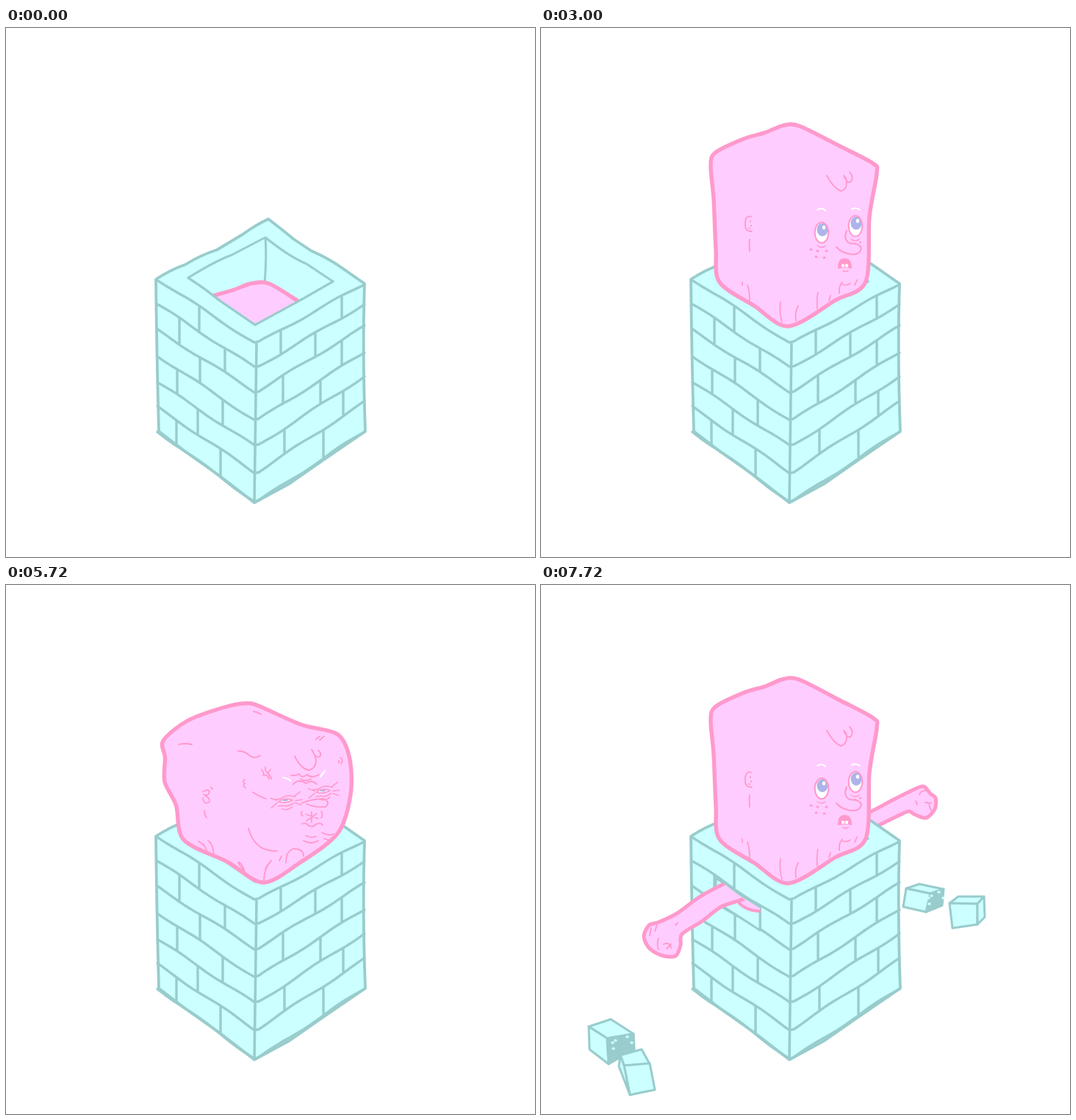
Recreate the animation shown at these times as an HTML page with a canvas. Size 720 px wide and 720 px high, loop 8.16 s.

```html
<!DOCTYPE html>
<html lang="en">
<head>
<meta charset="utf-8">
<title>Well head</title>
<style>
html, body { margin: 0; width: 100%; height: 100%; overflow: hidden; background: #fff; }
canvas { display: block; width: 100vw; height: 100vh; }
</style>
</head>
<body>
<canvas id="c" width="720" height="720"></canvas>
<script>
const g = document.getElementById('c').getContext('2d');
const LOOP = 8160, STEP = 40;
const SKIN = '#fcf', PINK = '#f9c', STONE = '#cff', TEAL = '#9cc', IRIS = '#aeb4ea';
g.lineCap = g.lineJoin = 'round';

const nums = s => s.trim().split(/[\s,]+/).map(Number);
const clamp = u => Math.max(0, Math.min(1, u));
const span = (t, a, b) => clamp((t - a) / (b - a));
const easeIn = u => u * u;
const easeOut = u => 1 - (1 - u) ** 2;
const easeBoth = u => u * u * (3 - 2 * u);

function ink(path, color, width, fill) {
  if (fill) { g.fillStyle = fill; g.fill(path); }
  if (color) { g.strokeStyle = color; g.lineWidth = width; g.stroke(path); }
}
const draw = (d, color, width, fill) => ink(new Path2D(d), color, width, fill);

function at(x, y, angle, fn) {
  g.save();
  g.translate(x, y);
  g.rotate(angle);
  fn();
  g.restore();
}

// Catmull-Rom curve through flat x,y pairs
function curve(p, closed) {
  const n = p.length / 2, path = new Path2D(), k = 0.15;
  const pt = i => {
    i = closed ? (i + n) % n : Math.max(0, Math.min(n - 1, i));
    return [p[2 * i], p[2 * i + 1]];
  };
  path.moveTo(p[0], p[1]);
  for (let i = 0; i < (closed ? n : n - 1); i++) {
    const [a, b, c, d] = [pt(i - 1), pt(i), pt(i + 1), pt(i + 2)];
    path.bezierCurveTo(b[0] + (c[0] - a[0]) * k, b[1] + (c[1] - a[1]) * k,
      c[0] - (d[0] - b[0]) * k, c[1] - (d[1] - b[1]) * k, c[0], c[1]);
  }
  if (closed) path.closePath();
  return path;
}

// ---- poses: 17 outline points, then ear, eyes, nose, mouth, curl, look, lid/tilt
const EDGE = 34, BODY = 46;
const low = nums(`338,407 290,378 250,345 241,315 237,275 235,248 243,234 275,218 320,205
  345,196 370,196 410,220 446,244 453,265 450,318 443,346 395,380
  283,322 376,336 427,325 414,372 410,400 407,276 0,-3 1,0`);
const tall = nums(`337,406 290,378 243,346 238,300 235,230 231,185 237,166 275,147 305,138
  330,128 352,129 405,156 452,181 457,195 447,255 442,345 400,371
  283,265 382,277 428,268 418,296 413,321 407,206 1,-4 0,0`);
const side = nums(`335,403 295,378 252,350 253,320 262,255 267,190 273,171 315,157 350,151
  375,146 388,147 425,171 458,191 464,208 453,300 440,345 395,377
  312,272 419,279 449,279 441,308 426,326 427,216 4,0 0,.6`);
const droop = nums(`340,403 300,382 249,348 251,315 262,265 283,212 300,183 350,182 400,184
  430,184 440,185 465,210 502,235 491,257 461,295 445,345 400,373
  311,284 415,300 447,302 438,335 416,342 450,248 -2,4 0,1`);
const squash = nums(`350,405 300,377 242,347 230,300 216,268 215,235 214,212 245,185 295,167
  325,161 345,165 400,190 451,203 466,235 469,285 450,338 400,378
  272,288 380,292 430,282 418,296 416,315 412,238 0,0 0,0`);

const mix = (a, b, u) => a.map((v, i) => v + (b[i] - v) * u);
function lift(p, d) {
  const top = Math.min(...p.slice(0, EDGE).filter((v, i) => i % 2));
  return p.map((v, i) => i < BODY && i % 2 ? v - d * Math.max(0, (345 - v) / (345 - top)) : v);
}
const sunk = low.map((v, i) => i >= BODY ? v : i % 2 ? v + 152 : v - 12);
const risen = lift(tall, -9), turned = mix(side, droop, 0.15), gasp = lift(tall, 15);

const keys = [
  [0, sunk], [1320, sunk], [2040, low, easeOut], [2760, low],
  [2960, lift(tall, -3), easeBoth], [3080, risen, easeBoth], [3400, risen],
  [3720, side, easeIn], [4040, turned, easeOut], [4360, turned],
  [4600, lift(droop, -4), easeBoth], [4720, droop, easeOut], [4880, droop],
  [5160, lift(tall, 17), easeBoth], [5280, gasp, easeOut], [5520, gasp],
  [5720, squash, easeBoth], [7520, squash],
  [7640, lift(tall, 2), easeBoth], [7720, tall, easeOut], [LOOP, tall]
];
function poseAt(t) {
  const i = keys.findIndex(k => k[0] > t);
  const [t0, a] = keys[i - 1], [t1, b, ease] = keys[i];
  const u = span(t, t0, t1);
  return mix(a, b, ease ? ease(u) : u);
}

// ---- tower
const leftY = nums('342 376 411 446 482 516 549');
const midY = nums('430 463 496 535 570 606 646');
const rightY = nums('348 376 406 441 474 509 549');
const wave = (x, k) => 1.4 * Math.sin(x / 15 + k * 2);
const wallY = (x, k) => wave(x, k) + (x < 340
  ? leftY[k] + (midY[k] - leftY[k]) * (x - 206) / 134
  : midY[k] + (rightY[k] - midY[k]) * (x - 340) / 148);
// vertical joints of each course
const joints = [[263, 374, 457], [236, 298, 421], [264, 377, 457], [233, 295, 428], [261, 379, 459], [232, 292, 432]];

const bricks = new Path2D();
for (let k = 0; k < 7; k++)
  for (let x = 206; x <= 488; x += 6) bricks[x > 206 ? 'lineTo' : 'moveTo'](x, wallY(x, k));
joints.forEach((row, k) => row.forEach(x => {
  bricks.moveTo(x, wallY(x, k));
  bricks.lineTo(x, wallY(x, k + 1));
}));
const shell = 'M204,342 Q224,329 244,322 Q265,309 287,302 L322,281 Q340,268 357,260 Q378,276 391,287 L415,303 Q440,314 458,327 L488,348 Q485,440 489,549 L432,588 L386,620 L338,646 L290,609 L246,578 L208,549 Q205,440 204,342Z';
const rimBack = 'M248,340 Q285,317 307,309 L353,285 Q385,311 409,321 L445,345';
const rimFront = 'M248,340 Q270,354 291,371 L339,404 L405,368 L445,345';

function tower() {
  draw(shell, TEAL, 3.8, STONE);
  ink(bricks, TEAL, 3.4);
  draw('M341,430 Q339,540 338,646', TEAL, 3.6);
  draw(rimBack + 'M353,285 Q355,310 352,348', TEAL, 3);
  draw(rimFront, TEAL, 3);
}

// ---- face
function eye(x, y, look, lid, tilt, shut) {
  if (lid > 0.05)
    at(x + 6 * lid, y + 15 * lid, -0.2, () => draw('M-10,0 a10,14 0 1,0 20,0 a10,14 0 1,0 -20,0', PINK, 1.5, PINK));
  at(x, y, tilt * 0.25 - lid * 0.15, () => {
    const ry = 13.5 * (1 - shut) + 0.5;
    const ball = new Path2D();
    ball.ellipse(0, 0, 9.3, ry, 0, 0, 7);
    ink(ball, null, 0, shut > 0.7 ? PINK : '#fff');
    g.save();
    g.clip(ball);
    const iris = new Path2D(), dot = new Path2D();
    iris.ellipse(look[0], look[1], 7.5, 9, 0, 0, 7);
    dot.ellipse(look[0] + 2, look[1] - 3, 2.2, 2.8, 0, 0, 7);
    ink(iris, null, 0, IRIS);
    ink(dot, null, 0, '#fff');
    g.restore();
    ink(ball, PINK, 2);
    draw('M-6,18 q6,4 11,0', PINK, 1.4);
  });
}

function calmFace(p, shut) {
  const [ex, ey, lx, ly, rx, ry, nx, ny, mx, my, cx, cy, dx, dy, lid, tilt] = p.slice(EDGE);
  at(ex, ey, tilt * 0.15, () => draw('M3,-10 q-8,-2 -8,9 q-1,12 9,11 M2,-4 v1 M3,2 v1 M0,6 h1 M1,21 q-1,5 0,16', PINK, 1.8));
  at(cx, cy, -tilt * 0.5, () => draw('M-18,-8 Q-9,9 1,13 Q9,11 9,2 Q9,-5 5,-8 Q9,2 14,1 Q20,-5 13,-13', PINK, 1.9));
  draw(`M${lx - 6},${ly - 31 + lid * 9} q6,-4 11,1 M${rx - 5},${ry - 23 + lid * 6} q6,-3 11,1`, '#fff', 2);
  eye(lx, ly, [dx, dy], lid, tilt, shut);
  eye(rx, ry, [dx, dy], lid, tilt, shut);
  const fy = ly + 30 + lid * 11 - tilt * 6, fx = lx - 4 + lid * 12;
  [[-11, -7], [-2, -5], [10, -5], [-4, 3], [7, 4]].forEach(([x, y]) => draw(`M${fx + x},${fy + y} h1`, PINK, 3));
  draw(`M${rx - 1},${ry + 24} h1 M${rx + 6},${ry + 22} h1 M${rx + 5},${ry + 28} h1`, PINK, 2.4);
  at(nx, ny, tilt * 0.65, () => draw('M-2,-21 q-5,12 4,17 q14,0 16,7 q-2,9 -13,8 q-13,-1 -21,-10', PINK, 2, SKIN));
  at(mx, my, -tilt * 0.15, () => {
    draw('M-8,5 q0,-12 8,-12 q9,0 9,12 q-4,-2 -9,-1 q-4,0 -8,1z', PINK, 2, PINK);
    draw('M-4,0 h4 v4 h-4z M1,0 h4 v4 h-4z', null, 0, '#fff');
    draw('M-2,9 q4,2 7,0 M-4,27 q7,3 12,-1', PINK, 1.7);
  });
}

const folds = 'M274,346 v4 M281,350 q3,8 3,22 M326,373 q-2,14 2,27 M350,378 q-5,9 -3,20 M377,360 q-2,8 -1,22 M392,371 l2,-7 M410,346 q-5,6 -4,15 M427,350 l3,-7';
const creases = [
  'M235,216 q8,-2 18,0 M316,225 q9,0 14,5 q8,7 16,1 M337,171 q6,1 10,4 M422,209 l5,-4 M427,210 l6,-5 M455,234 q5,2 1,8 M453,238 v3',
  'M348,250 q4,6 2,8 q6,-2 8,5 M353,247 q-1,5 4,9 M360,250 q-2,4 -4,5 q5,5 5,8 M325,264 q-5,2 0,5 q-4,3 1,6',
  'M268,280 q8,-4 9,1 q-2,6 -8,3 q9,5 8,10 q-8,5 -9,-5 M279,274 l2,3 M270,306 q0,6 3,10 M330,330 q8,32 39,31 M336,281 q7,5 18,9',
  'M393,232 q8,17 19,19 q10,-2 10,-14 M422,237 q-2,-9 -6,-14 q5,12 11,10 q3,-5 -2,-9',
  'M388,258 q7,1 11,-2 q3,7 11,1 q6,6 16,0 M391,270 q8,-8 17,-1 q7,-6 15,1 M401,263 q6,4 14,0',
  'M402,296 q14,-6 31,-6 q9,5 2,11 q-15,1 -26,-4',
  'M408,311 l17,6 M416,308 v14 M423,310 l-14,10 M403,307 q-3,4 1,6 M429,307 q3,5 0,9 M403,324 q6,-2 8,2 q6,4 12,-2 q6,-2 8,2',
  'M405,347 q10,6 20,0 M430,336 q8,5 16,2 M433,344 q7,4 12,1 M408,340 q8,4 14,1',
  'M351,403 q0,-19 10,-29 M353,385 q3,-6 7,-9 M381,377 q0,-16 10,-19 q14,0 14,10 M372,374 l3,-6',
  'M326,398 q-2,-18 -9,-22 M316,377 l7,10 M262,348 l8,5 M283,367 q-1,-16 -8,-20 M268,353 q3,1 5,7'
];
function squint(x, y) {
  at(x, y, -0.12, () => {
    draw('M-9,0 q9,-5 19,0 q-9,4 -19,0', PINK, 1.6, '#fff');
    draw('M-2,-1 h5', IRIS, 2);
    draw('M-13,-4 q6,2 12,-2 q7,-2 15,2 M-20,7 l9,-6 M-19,-6 l8,4 M-10,6 q7,-1 10,1 q7,0 11,-3 M-6,10 q7,4 15,-1 M13,-5 l9,-5 M14,1 l9,0 M13,4 l8,4', PINK, 1.5);
  });
}
function strainFace(t) {
  const j = t <= 6360 ? t / STEP % 2 : 0;
  g.save();
  g.translate(0, j);
  draw(creases.join(' '), PINK, 1.8);
  draw('M377,261 q6,1 10,4 M428,260 l6,-8', '#fff', 2.2);
  squint(380, 292 + j);
  squint(431, 281 - j);
  g.restore();
}

function head(t) {
  let p = poseAt(t);
  const straining = t >= 5640 && t < 7600;
  if (straining && t < 6400) p = p.map((v, i) => i < EDGE && i % 4 === 2 ? v + (t / STEP % 2) * 1.5 : v);
  const skin = curve(p.slice(0, EDGE), true);
  g.save();
  if (t < 2040) {
    const o = t > 1480 ? 4 : 0;
    g.clip(new Path2D(`M0,0 H720 V${345 + o} H445 L339,${404 + o} L248,${340 + o} H0Z`));
  }
  ink(skin, null, 0, SKIN);
  g.save();
  g.clip(skin);
  const shut = Math.max(0, 1 - Math.abs(t - 2380) / 90);
  if (straining) strainFace(t);
  else {
    calmFace(p, shut);
    if (t > 1700) draw(folds, PINK, 1.8);
  }
  g.restore();
  ink(skin, PINK, 5.4);
  g.restore();
  if (t < 1480) draw(rimFront, TEAL, 3);
  else if (t < 2040) draw(rimFront, PINK, 5);
}

// ---- arms and loose bricks
const armLeft = nums('290,386 248,407 215,425 185,447 160,459 147,463 140,478 147,494 164,504 183,505 190,490 192,475 220,457 245,438 276,427 310,408');
const armRight = nums('420,322 446,310 480,292 500,282 520,274 530,284 537,290 536,305 524,317 508,312 500,308 480,317 462,326 436,340');

function reach(t) {
  if (t < 6520) return easeOut(span(t, 6360, 6520)) * 1.04;
  if (t < 6720) return 1.04 - 0.06 * easeBoth(span(t, 6520, 6720));
  return 0.98 + 0.02 * span(t, 7520, 7680);
}
function arm(points, knuckles, dx, dy) {
  g.translate(dx, dy);
  ink(curve(points), PINK, 5, SKIN);
  draw(knuckles, PINK, 1.8);
}
function leftArm(t) {
  const r = 1 - reach(t);
  draw('M238,399 L298,437 V470 L238,431Z', TEAL, 3, STONE);
  draw('M250,407 L298,437 V445 Q280,443 268,430Z', null, 0, SKIN);
  draw('M268,431 Q278,443 297,444', PINK, 4);
  draw('M248,407 L298,438', TEAL, 3);
  g.save();
  g.clip(new Path2D('M0,200 L247,405 L277,428 L300,448 V720 H0Z'));
  arm(armLeft, 'M150,467 l-2,10 M158,463 l-3,8 M160,481 q-3,9 0,15 M167,489 q8,-4 10,5 M171,495 l6,-6 M183,463 l3,-3', 115 * r, -58 * r);
  g.restore();
}
function rightArm(t) {
  const r = 1 - reach(t);
  g.save();
  arm(armRight, 'M515,285 q3,-6 8,-5 M523,296 l8,1 M528,299 l3,8 M510,294 l2,5', -95 * r, 48 * r);
  g.restore();
}

const rubble = [
  { x: 96, y: 621, from: [262, 428], rise: 70, spin: -5, faces: ['M-31,-20 L-1,-30 L30,-10 L-6,-4Z', 'M-31,-20 L-6,-4 L-4,31 L-30,11Z'], broken: 'M-6,-4 L30,-10 L31,11 L-4,31Z' },
  { x: 131, y: 663, from: [280, 440], rise: 30, spin: 5, faces: ['M-23,-23 L6,-31 L17,-11 L-18,-9Z', 'M-18,-9 L17,-12 L24,24 L-10,31Z', 'M-23,-23 L-18,-9 L-10,31 L-25,-8Z'] },
  { x: 520, y: 426, from: [455, 350], rise: 60, spin: 5, faces: ['M-23,-13 L-5,-19 L28,-12 L10,-6Z', 'M-23,-13 L10,-6 L4,19 L-27,12Z'], broken: 'M10,-6 L28,-12 L26,10 L4,19Z' },
  { x: 580, y: 445, from: [460, 345], rise: 100, spin: -6, faces: ['M-24,-12 L-12,-21 L23,-21 L14,-11Z', 'M-24,-12 L14,-11 L14,17 L-20,22Z', 'M14,-11 L23,-21 L24,7 L14,17Z'] }
];
function chunk(b, t) {
  const u = span(t, 6360, 6720), v = span(t, 6720, 6960);
  const hop = b.rise * 4 * u * (1 - u) + 14 * 4 * v * (1 - v);
  const slide = 1 - 0.06 * (1 - v);
  const x = b.from[0] + (b.x - b.from[0]) * u * slide;
  const y = b.from[1] + (b.y - b.from[1]) * u * slide - hop;
  at(x, y, b.spin * (1 - u) + 0.3 * Math.sin(v * Math.PI), () => {
    b.faces.forEach(f => draw(f, TEAL, 3, STONE));
    if (!b.broken) return;
    draw(b.broken, TEAL, 3, TEAL);
    const right = b.x > 300;
    [[1, 2], [5, -1], [21, -6], [27, 2], [2, 10]].forEach(([dx, dy]) =>
      draw(`M${dx + (right ? 6 : 0) * (dx < 10)},${dy - (right ? 2 : 0)} h1`, STONE, 3.5));
  });
}

function scene(t) {
  g.fillStyle = '#fff';
  g.fillRect(0, 0, 720, 720);
  const burst = t >= 6400;
  if (burst) {
    chunk(rubble[2], t);
    chunk(rubble[3], t);
    rightArm(t);
  }
  tower();
  head(t);
  if (burst) {
    leftArm(t);
    chunk(rubble[0], t);
    chunk(rubble[1], t);
  }
}

const start = performance.now();
function tick() {
  const t = (performance.now() - start) % LOOP;
  scene(Math.floor(t / STEP) * STEP);
  requestAnimationFrame(tick);
}
tick();
</script>
</body>
</html>
```
